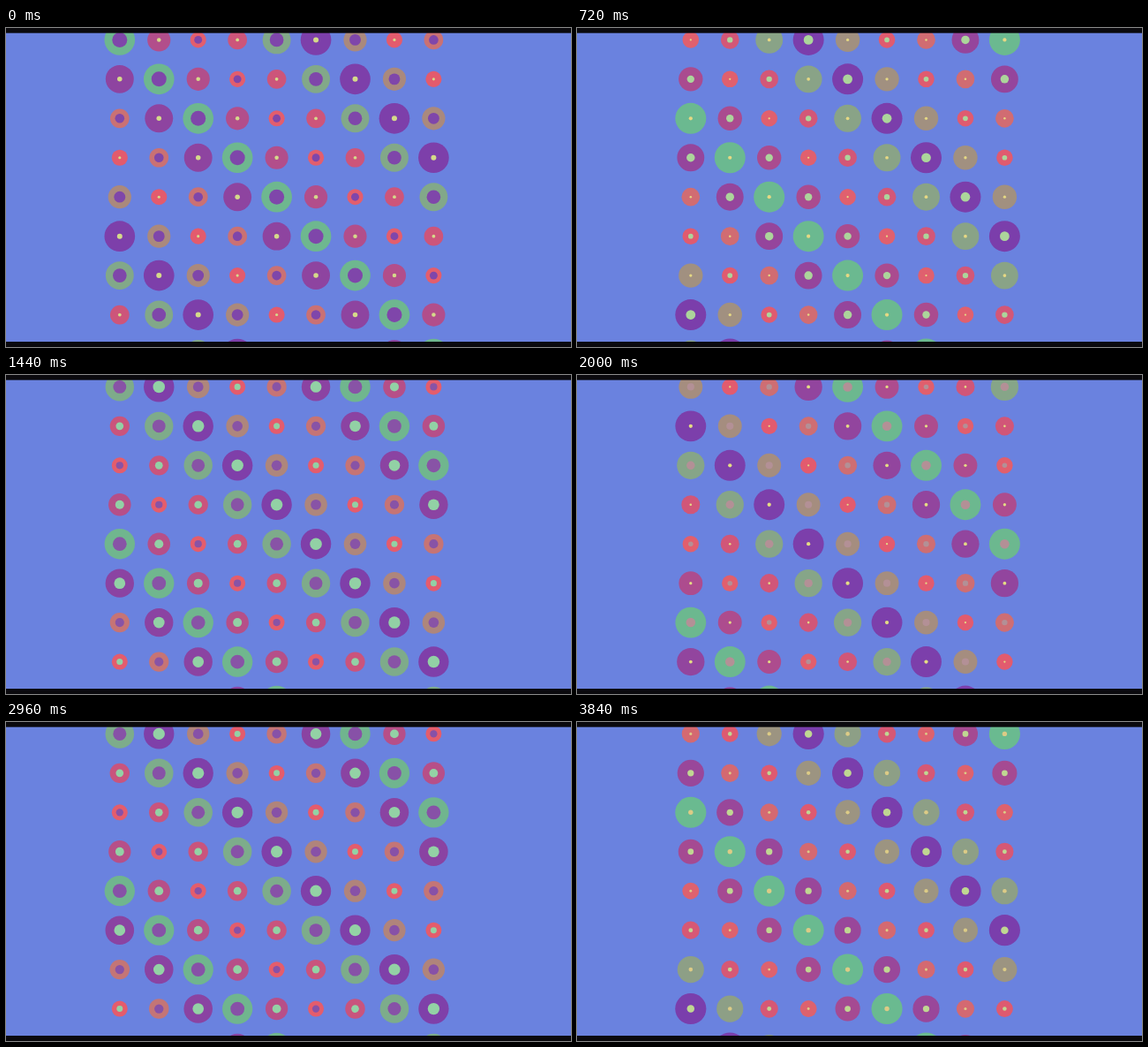
Recreate the animation shown at these times as an HTML page with a canvas. Size 640x361 px, loop 3.92 s.

```html
<!DOCTYPE html>
<html>
<head>
<meta charset="utf-8">
<style>
  html, body { margin: 0; width: 100%; height: 100%; overflow: hidden; background: #0a090d; }
  canvas { display: block; }
</style>
</head>
<body>
<canvas width="640" height="361"></canvas>
<script>
const ctx = document.querySelector('canvas').getContext('2d');
const LOOP = 3920, STEP = 80, TAU = Math.PI * 2;
const COUNT = 9, GAP = 44.45, LEFT = 128.8, TOP = 13.4;
const RED = [229, 92, 108], YELLOW = [232, 220, 130];

// Even and odd diagonals: colour of a large disc, of a large core, and the core's peak phase
const kinds = [
  { disc: [106, 186, 144], core: [122, 62, 172], peak: 0.93 },
  { disc: [122, 62, 172], core: [110, 205, 180], peak: 0.63 }
];

const wave = turns => 0.5 + 0.5 * Math.cos(TAU * turns);
const mix = (a, b, k) => `rgb(${a.map((v, i) => Math.round(v + (b[i] - v) * k))})`;

function circle(x, y, r, color) {
  ctx.fillStyle = color;
  ctx.beginPath();
  ctx.arc(x, y, r, 0, TAU);
  ctx.fill();
}

// Turns completed after t ms: slow start, quicker middle, slower end
function turnsAt(t) {
  const s = t / 3840;
  return 2.324 * s - 0.045 * Math.sin(TAU * s) - 0.03 * Math.sin(Math.PI * s);
}

function draw(t) {
  const turns = turnsAt(t);
  ctx.fillStyle = '#6a82df';
  ctx.fillRect(0, 0, 640, 361);
  for (let row = 0; row < COUNT; row++) {
    for (let col = 0; col < COUNT; col++) {
      const diagonal = col - row;
      const kind = kinds[Math.abs(diagonal) % 2];
      const size = wave((diagonal + 0.28) / 5 + turns);
      const open = wave(turns - kind.peak);
      const x = LEFT + col * GAP, y = TOP + row * GAP;
      const radius = 8.9 + 8.7 * size;
      circle(x, y, radius, mix(RED, kind.disc, size));
      circle(x, y, radius * (0.11 + 0.4 * open), mix(YELLOW, kind.core, open));
    }
  }
  ctx.fillStyle = '#0a090d';
  ctx.fillRect(0, 0, 640, 5.7);
  ctx.fillRect(0, 355, 640, 6);
}

const start = performance.now();
function tick() {
  const t = (performance.now() - start) % LOOP;
  draw(Math.floor(t / STEP) * STEP);
  requestAnimationFrame(tick);
}
tick();
</script>
</body>
</html>
```
